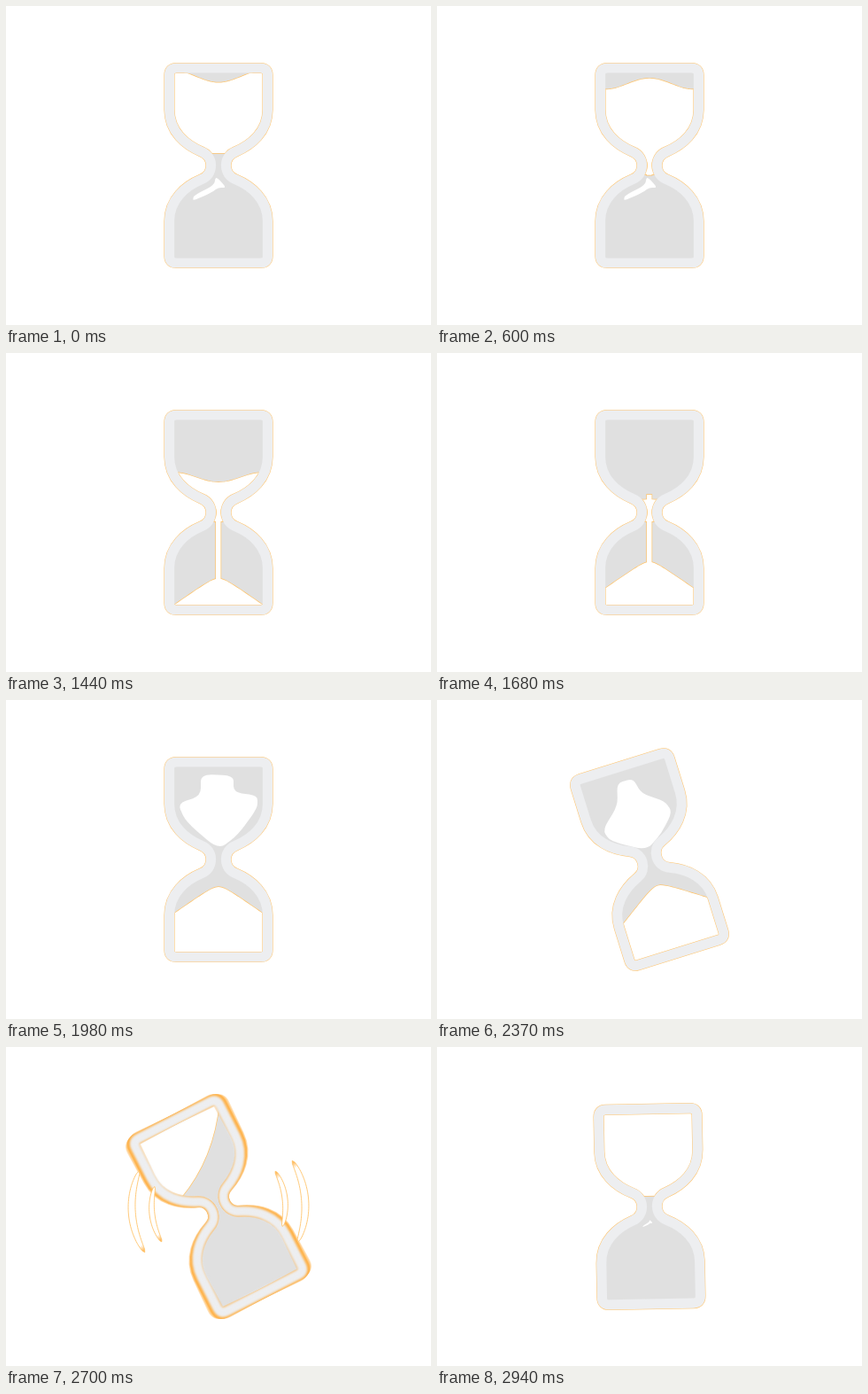
An HTML page with a canvas for the animation above (2970 ms loop, 480 px wide and 360 px high).

```html
<!DOCTYPE html>
<html lang="en">
<head>
<meta charset="utf-8">
<title>Hourglass</title>
<style>
  html, body { margin: 0; width: 100%; height: 100%; overflow: hidden; background: #fff; }
  canvas { display: block; width: 480px; height: 360px; }
</style>
</head>
<body>
<canvas id="stage" width="480" height="360"></canvas>
<script>
const ctx = document.getElementById('stage').getContext('2d');
const LOOP = 2970, STEP = 30, FLIP = 2550;
const CX = 240, CY = 180, NECK = 166, RAD = Math.PI / 180;
const FRAME = '#edeef0', GLASS = '#e0e0e0', EDGE = '#ffc46c', GLOW = '#ffae42';

// Centre line of the frame; the shape is the same after half a turn.
const outline = new Path2D(
  'M192.5 70H287.5Q295.5 70 295.5 78V117C295.5 142 277 157 259 164.5' +
  'C245 170 245 190 259 195.5C277 203 295.5 218 295.5 243V282Q295.5 290 287.5 290' +
  'H192.5Q184.5 290 184.5 282V243C184.5 218 203 203 221 195.5' +
  'C235 190 235 170 221 164.5C203 157 184.5 142 184.5 117V78Q184.5 70 192.5 70Z');

const splash = [[237, 192], [249, 205], [240, 205], [231, 211], [211, 220], [212, 214], [235, 202]];
const blob = [[220, 84], [257, 85], [257, 104], [284, 108], [284, 122], [262, 152],
  [240, 169], [203, 137], [194, 117], [220, 108]];

const ramp = (t, from, to) => Math.min(1, Math.max(0, (t - from) / (to - from)));
const bump = (t, from, to) => Math.sin(Math.PI * ramp(t, from, to));
const lerp = (a, b, u) => a + (b - a) * u;
const easeOut = u => 1 - (1 - u) ** 2;
const easeInOut = u => u * u * (3 - 2 * u);

// Wind up to the left, swing over, then settle upright.
const angleAt = t => -18 * easeOut(ramp(t, 2250, 2400))
  + 171 * easeInOut(ramp(t, 2400, 2690)) + 27 * ramp(t, 2700, 2950);

function polygon(pts) {
  const p = new Path2D();
  pts.forEach(q => p.lineTo(...q));
  p.closePath();
  return p;
}

// Closed shape with softened corners
function soft(pts) {
  const p = new Path2D(), n = pts.length;
  const mix = (a, b) => [lerp(a[0], b[0], 0.35), lerp(a[1], b[1], 0.35)];
  pts.forEach((q, i) => {
    p.lineTo(...mix(q, pts[(i + n - 1) % n]));
    p.quadraticCurveTo(...q, ...mix(q, pts[(i + 1) % n]));
  });
  p.closePath();
  return p;
}

// Area between a height function and a flat base
function heap(height, base) {
  const pts = [[180, base]];
  for (let x = 180; x <= 300; x += 3) pts.push([x, Math.min(height(x), base)]);
  return polygon([...pts, [300, base]]);
}

function topSand(t, head) {
  const level = 80 + 60.5 * (t / 1440) ** 2.3;
  const wave = 6.5 * Math.cos(2 * Math.PI * t / 1320);
  return heap(x => level + wave * Math.cos(Math.PI * (x - CX) / 50), Math.min(head, 190));
}

function pile(t) {
  const peak = 292 - 81 * ramp(t, 840, 1980) ** 1.2;
  return heap(x => peak + 0.7 * (Math.hypot(x - CX, 8) - 8), 300);
}

// After the turn the sand slides from the left wall across the upper bulb.
function slidingSand(t) {
  const u = ramp(t, FLIP, 2940), foot = lerp(142, 168, u);
  const p = new Path2D();
  p.moveTo(180, 60);
  p.lineTo(294, 60);
  p.lineTo(294, 76);
  p.quadraticCurveTo(lerp(235, 300, u), lerp(110, 160, u), lerp(180, 250, u), foot);
  p.lineTo(180, foot);
  p.closePath();
  return p;
}

function sandPaths(t) {
  if (t >= FLIP) return [slidingSand(t)];
  const head = lerp(NECK, 290, ramp(t, 540, 840));
  const tail = lerp(160, 290, ramp(t, 1740, 1890));
  const list = [];
  if (t < 1740) list.push(topSand(t, head));
  if (head > 188 && tail < 290)
    list.push(polygon([[237, tail], [242.5, tail], [242.5, head], [237, head]]));
  if (t > 840) list.push(pile(t));
  return list;
}

const scaled = (pts, k, x0, y0) => pts.map(([x, y]) => [lerp(x0, x, k), lerp(y0, y, k)]);

// The blob narrows at the top while its shoulders sag.
function sagged(u) {
  return blob.map(([x, y]) => [
    lerp(x, CX + 1, 0.5 * u * Math.max(0, (169 - y) / 85) ** 3),
    y + 15 * u * ((x - CX) / 45) ** 2
  ]);
}

// White patches without a rim
function patch(t) {
  if (t < 780) return scaled(splash, 1 - ramp(t, 630, 780), 230, 208);
  if (t > 2900) return scaled(splash, 0.3, 241, 196);
  const size = ramp(t, 1680, 1980) * (1 - ramp(t, 2370, 2520));
  return scaled(sagged(ramp(t, 2250, 2370)), size, CX, NECK);
}

function strokeFrame(color, width) {
  ctx.strokeStyle = color;
  ctx.lineWidth = width;
  ctx.stroke(outline);
}

function turn(deg, sx = 1, sy = 1) {
  ctx.translate(CX, CY);
  ctx.rotate(deg * RAD);
  ctx.scale(sx, sy);
  ctx.translate(-CX, -CY);
}

// Fan of faint strokes that blurs the rim along the turn
function glow(smear) {
  for (let k = -3; k <= 3; k++) {
    ctx.save();
    turn(smear * k / 3);
    ctx.globalAlpha = 0.35;
    strokeFrame(GLOW, 12);
    ctx.restore();
  }
}

function contents(t) {
  ctx.save();
  ctx.clip(outline);
  ctx.fillStyle = GLASS;
  ctx.fill(outline);
  const sand = sandPaths(t);
  ctx.strokeStyle = EDGE;
  ctx.lineWidth = 1.4;
  sand.forEach(p => ctx.stroke(p));
  ctx.fillStyle = '#fff';
  sand.forEach(p => ctx.fill(p));
  ctx.fill(soft(patch(t)));
  for (const p of sand) {
    ctx.save();
    ctx.clip(p);
    strokeFrame(EDGE, 12.2);
    ctx.restore();
  }
  ctx.restore();
}

function hourglass(t, angle) {
  const smear = 2.2 * bump(t, 2430, 2800);
  ctx.save();
  turn(t >= FLIP ? angle - 180 : angle);
  strokeFrame(EDGE, 12.2);
  contents(t);
  if (smear > 0.05) {
    glow(smear);
    turn(0, 1 - 0.024 * smear, 1 - 0.003 * smear);
    ctx.filter = `blur(${smear}px)`;
    strokeFrame(FRAME, 11 - smear * 0.5);
  }
  strokeFrame(FRAME, 11.2 - smear * 2);
  ctx.restore();
}

function crescent(radius, width, from, to) {
  const at = (a, r) => [CX + r * Math.cos(a * RAD), CY + r * Math.sin(a * RAD)];
  const outer = [], inner = [];
  for (let u = 0; u <= 1; u += 1 / 32) {
    const half = width * bump(u, 0, 1) ** 0.4;
    outer.push(at(lerp(from, to, u), radius + half));
    inner.unshift(at(lerp(from, to, u), radius - half));
  }
  const p = polygon([...outer, ...inner]);
  const tip = at(from, radius);
  const rim = ctx.createRadialGradient(...tip, 1, ...tip, 9);
  rim.addColorStop(0, GLOW);
  rim.addColorStop(1, '#fff');
  ctx.fillStyle = rim;
  ctx.fill(p);
  ctx.strokeStyle = EDGE;
  ctx.lineWidth = 0.9;
  ctx.stroke(p);
}

function trails(t, angle) {
  const span = 69 * bump(t, 2490, 2790);
  if (span < 2) return;
  for (const side of [0, 180]) {
    const lead = angle + 51 + side;
    crescent(98, 4, lead - span, lead);
    crescent(75.5, 3, lead - span, lead - span * 0.12);
  }
}

function draw(t) {
  const angle = angleAt(t);
  ctx.fillStyle = '#fff';
  ctx.fillRect(0, 0, 480, 360);
  hourglass(t, angle);
  trails(t, angle);
}

const start = performance.now();
function tick() {
  const t = (performance.now() - start) % LOOP;
  draw(Math.floor(t / STEP) * STEP);
  requestAnimationFrame(tick);
}
tick();
</script>
</body>
</html>
```
